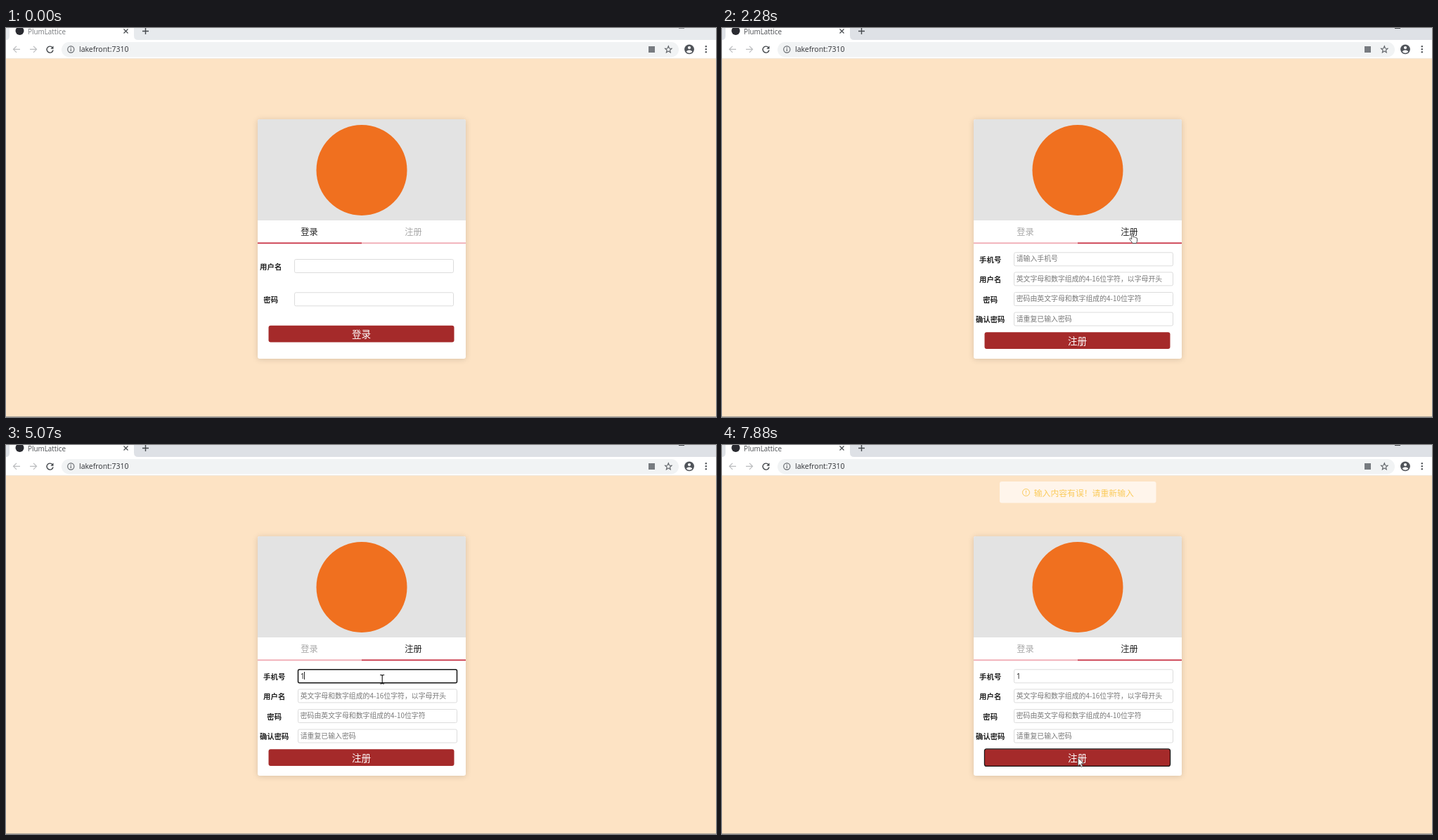
Recreate the animation shown at these times as an HTML page with a canvas. Size 1010 by 554 pixels, loop 8 s.

```html
<!DOCTYPE html>
<html lang="zh">
<head>
<meta charset="utf-8">
<title>Login form</title>
<style>
html, body { margin: 0; width: 100%; height: 100%; overflow: hidden; background: #fde3c4; }
canvas { display: block; }
</style>
</head>
<body>
<canvas id="stage" width="1010" height="554"></canvas>
<script>
const ctx = document.getElementById('stage').getContext('2d');
const LOOP = 8000;
const CJK = '"Noto Sans CJK SC", "Noto Sans CJK", sans-serif';
const LATIN = '"Open Sans", sans-serif';

const SWITCH = 2280, FOCUS = 2870, TYPED = 4980, SUBMIT = 7170, TOAST = 7360;

// Pointer poses: time, x, y, shape
const pointerTrack = [
  [380, 957, 537, arrow], [460, 782, 432, arrow], [530, 570, 318, arrow],
  [610, 400, 245, arrow], [680, 421, 252, arrow],
  [930, 428, 261, arrow], [1010, 448, 279, arrow], [1090, 468, 297, arrow],
  [1160, 488, 309, arrow], [1240, 507, 317, arrow], [1330, 527, 327, arrow],
  [1400, 549, 317, arrow], [1480, 571, 298, hand], [1560, 584, 281, hand],
  [1710, 583, 284, hand], [1790, 581, 287, hand], [1870, 580, 290, hand], [1950, 579, 292, hand],
  [2490, 572, 298, hand], [2570, 562, 308, arrow], [2640, 551, 324, beam],
  [2720, 542, 330, beam], [2790, 535, 333.5, beam],
  [6330, 551, 324, beam], [6390, 572, 298, hand],
  [6540, 569, 303, hand], [6620, 559, 331, beam], [6700, 546, 359, beam],
  [6780, 532, 387, beam], [6860, 519, 413, beam], [6940, 510, 433, arrow], [7020, 506, 445, arrow]
];

// Spans in which the blinking caret is visible
const caretSpans = [[FOCUS, 3410], [3970, 4520], [5070, 5620], [6170, 6700]];

function rect(x, y, w, h, fill) {
  ctx.fillStyle = fill;
  ctx.fillRect(x, y, w, h);
}

function paint(fill, stroke, lineWidth) {
  if (fill) { ctx.fillStyle = fill; ctx.fill(); }
  if (stroke) { ctx.strokeStyle = stroke; ctx.lineWidth = lineWidth; ctx.stroke(); }
}

function rounded(x, y, w, h, r, fill, stroke, lineWidth = 1) {
  ctx.beginPath();
  ctx.roundRect(x, y, w, h, r);
  paint(fill, stroke, lineWidth);
}

function circle(x, y, r, fill, stroke, lineWidth = 1) {
  ctx.beginPath();
  ctx.arc(x, y, r, 0, Math.PI * 2);
  paint(fill, stroke, lineWidth);
}

function path(d, x, y, stroke, lineWidth, fill) {
  const shape = new Path2D(d);
  ctx.save();
  ctx.translate(x, y);
  if (fill) { ctx.fillStyle = fill; ctx.fill(shape); }
  if (stroke) { ctx.strokeStyle = stroke; ctx.lineWidth = lineWidth; ctx.stroke(shape); }
  ctx.restore();
}

// Text is placed by the vertical middle of its glyphs.
function text(str, x, midY, size, color, { align = 'left', weight = 400, family = CJK } = {}) {
  ctx.font = `${weight} ${size}px ${family}`;
  ctx.textAlign = align;
  ctx.textBaseline = 'alphabetic';
  ctx.fillStyle = color;
  ctx.fillText(str, x, midY + size * 0.38);
}

function arrow(x, y) {
  path('M.5 .5V12L3.2 9.5L5.1 13.6L6.9 12.8L5.1 8.8H8.8Z', x, y, '#555', 0.9, '#fff');
}

function hand(x, y) {
  path('M3.7 9V1.6Q3.7 .5 4.7 .5T5.8 1.6V5.6Q7.6 5 8 6.1Q9.6 5.6 10 6.8Q11.6 6.5 11.6 8V11Q11.4 12.6 10.4 14.5H5Q3.4 12.2 .9 8.9Q.3 7.7 1.4 7.3Q2.3 7 3.7 9Z', x, y, '#444', 0.9, '#fff');
}

function beam(x, y) {
  path('M-3 -6H-1L0 -5L1 -6H3M0 -5V5.5M-3 6.5H-1L0 5.5L1 6.5H3', x + 0.2, y, '#111', 1.1);
}

function drawBrowser(active) {
  const strip = active ? '#dee1e6' : '#e7eaed';
  const ink = '#5f6368', faded = '#babcbe';
  rect(0, 0, 1010, 17, strip);
  path('M0 17Q5 17 5 11V0H182V11Q182 17 188 17Z', 0, 0, null, 0, '#fff');
  rect(0, 17, 1010, 26, '#fff');
  rect(0, 43, 1010, 1, '#f1e7da');

  circle(19.5, 4, 6, '#292a30');
  text('PlumLattice', 31, 5, 9.9, active ? '#4a4d51' : '#777a7e', { family: LATIN });
  path('M-3 -3L3 3M3 -3L-3 3', 170.5, 4.5, '#45494d', 1.2);
  path('M-4.5 0H4.5M0 -4.5V4.5', 198.5, 4.5, '#45494d', 1.4);
  rect(957, 0, 8, 1, active ? '#44474b' : '#8c8f93');

  path('M5 0H-4.5M0 -4.5L-4.5 0L0 4.5', 15, 30.3, faded, 1.2);
  path('M-5 0H4.5M0 -4.5L4.5 0L0 4.5', 39, 30.3, faded, 1.2);
  path('M3.5 -2.8A4.5 4.5 0 1 0 4.5 .8', 62.5, 30.5, '#45494d', 1.4);
  path('M5 -5V-.8H.8Z', 62.5, 30.5, null, 0, '#45494d');

  rounded(79, 20, 878, 21.5, 10.75, '#f1f3f4');
  circle(92.3, 30.5, 4.6, null, ink, 1.1);
  rect(91.7, 29.8, 1.2, 3.2, ink);
  rect(91.7, 27.8, 1.2, 1.2, ink);
  text('lakefront:7310', 104, 30.5, 10.5, '#303236', { family: LATIN });

  rect(914, 26, 9, 9, '#777b80');
  let star = '';
  for (let i = 0; i < 10; i++) {
    const r = i % 2 ? 2.2 : 5, a = i * Math.PI / 5 - Math.PI / 2;
    star += `${i ? 'L' : 'M'}${r * Math.cos(a)} ${r * Math.sin(a)}`;
  }
  path(star + 'Z', 942.3, 30.8, ink, 1.1);
  circle(972, 30.3, 6.9, '#50545a');
  circle(972, 28, 2.1, '#fff');
  path('M-4.2 3.8Q-3.6 1.3 0 1.3T4.2 3.8Q0 7 -4.2 3.8Z', 972, 30.3, null, 0, '#fff');
  for (const y of [26.3, 30.3, 34.3]) circle(995.8, y, 1.2, '#505459');
}

function drawCard() {
  rect(0, 44, 1010, 510, '#fde3c4');
  rect(0, 553, 1010, 1, '#aaa49b');
  ctx.save();
  ctx.shadowColor = 'rgba(0,0,0,.15)';
  ctx.shadowBlur = 8;
  ctx.shadowOffsetY = 1;
  rounded(358, 130, 296, 341, 3, '#fff');
  ctx.restore();
  rounded(358, 130, 296, 144, [3, 3, 0, 0], '#e3e3e3');
  circle(506, 202.5, 64.5, '#f0701f');
}

function drawTabs(registering) {
  ['登录', '注册'].forEach((name, i) => {
    const selected = registering === (i === 1);
    text(name, 431.5 + 148 * i, 290, 12.2, selected ? '#222' : '#a8a8a8', { align: 'center' });
    rect(358 + 148 * i, 305.5, 148, 1.7, selected ? '#c62a3d' : '#efa5ae');
  });
}

function field(label, labelX, x, y, hint, focused) {
  text(label, labelX, y + 10.6, 10.4, '#222', { align: 'center', weight: 700 });
  rounded(x + 0.5, y + 0.5, 226, 19, 2, '#fff', focused ? '#151515' : '#dcdcdc', focused ? 1.5 : 1);
  if (hint) text(hint, x + 3.7, y + 9.4, 9.9, '#777');
}

function button(label, y, focused) {
  rounded(373.5, y, 264, 23.8, 3, '#a52a2a');
  if (focused) rounded(373.4, y - 0.4, 264.2, 24.6, 3, null, '#161010', 1.2);
  text(label, 505.5, y + 12.2, 13.6, '#fff', { align: 'center' });
}

function drawLogin() {
  field('用户名', 376.7, 410, 329);
  field('密码', 376.7, 410, 376.3);
  button('登录', 423.8);
}

function drawRegister(t) {
  const focused = t >= FOCUS && t < SUBMIT;
  const typed = t >= TYPED;
  field('手机号', 381.7, 415, 319.3, typed ? '' : '请输入手机号', focused);
  field('用户名', 381.7, 415, 347.4, '英文字母和数字组成的4-16位字符，以字母开头');
  field('密码', 381.7, 415, 376, '密码由英文字母和数字组成的4-10位字符');
  field('确认密码', 381.7, 415, 404.5, '请重复已输入密码');
  button('注册', 433.2, t >= SUBMIT);

  if (typed) text('1', 419, 328.8, 9.9, '#111', { family: LATIN });
  if (caretSpans.some(([from, to]) => t >= from && t < to)) {
    rect(typed ? 424 : 419, typed ? 323 : 324, 1, 11, '#222');
  }
}

function drawToast() {
  const gold = '#fbcb5b';
  rounded(395, 52, 222.5, 30.5, 3, '#fff5eb');
  circle(432.5, 67.6, 5, null, gold, 1);
  rect(432, 64.8, 1, 3.6, gold);
  rect(432, 69.4, 1, 1.1, gold);
  text('输入内容有误！请重新输入', 443.7, 68, 11.85, gold);
}

function draw(t) {
  const registering = t >= SWITCH;
  drawBrowser(registering);
  drawCard();
  drawTabs(registering);
  if (registering) drawRegister(t);
  else drawLogin();
  if (t >= TOAST) drawToast();
  const pose = pointerTrack.findLast(([time]) => t >= time);
  if (pose) {
    const [, x, y, drawPointer] = pose;
    drawPointer(x, y);
  }
}

const start = performance.now();
function frame() {
  draw((performance.now() - start) % LOOP);
  requestAnimationFrame(frame);
}
frame();
</script>
</body>
</html>
```
